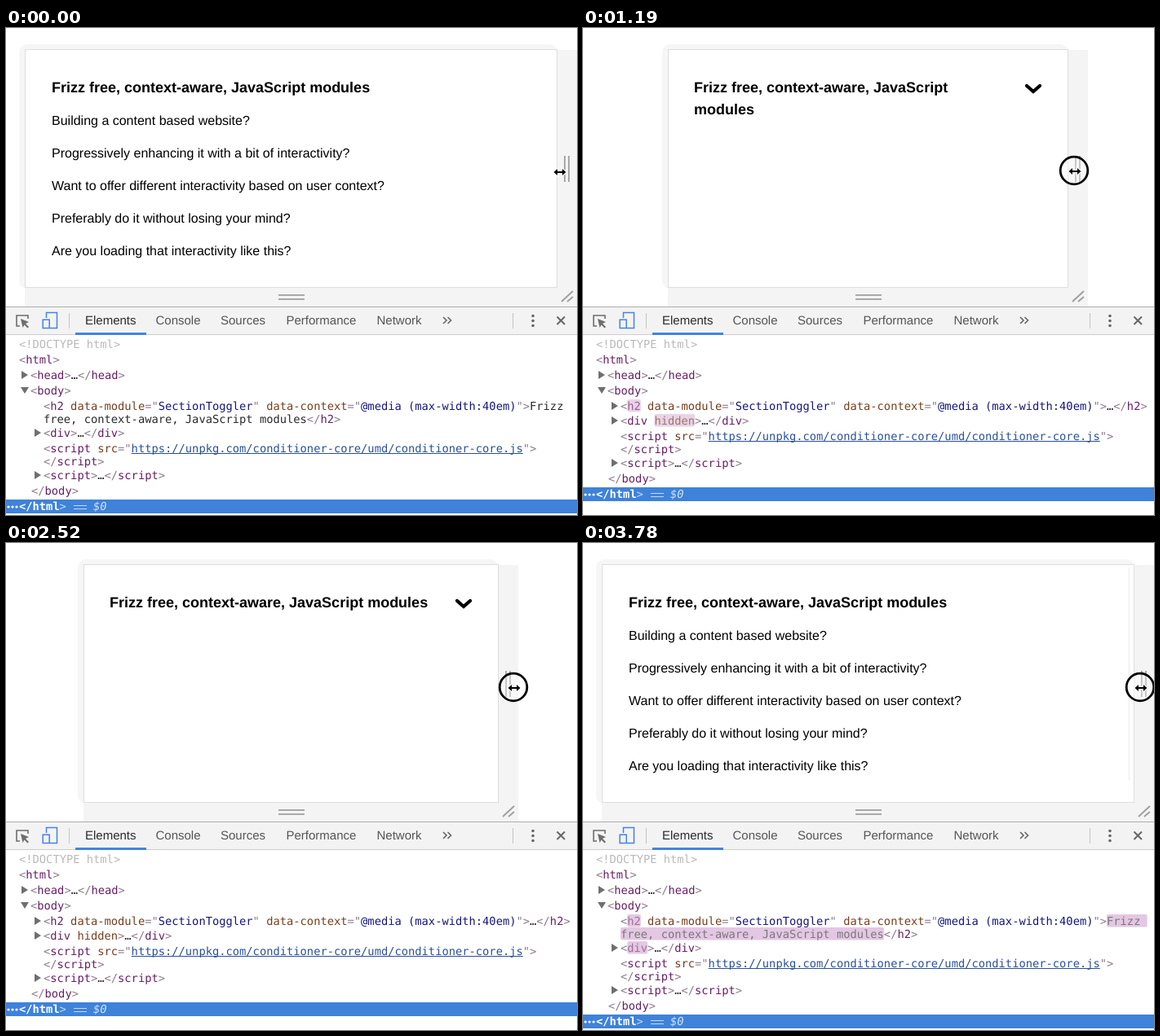
Animation of 700x598 px, one loop 3850 ms. Source, as an HTML page with a canvas:

```html
<!DOCTYPE html>
<html lang="en">
<head>
<meta charset="utf-8">
<title>Context-aware modules</title>
<style>
html, body { margin: 0; width: 700px; height: 598px; overflow: hidden; background: #fff; }
canvas { display: block; width: 700px; height: 598px; }
</style>
</head>
<body>
<canvas id="stage"></canvas>
<script>
const WIDTH = 700, HEIGHT = 598, LOOP = 3850, STEP = 70;
const COLLAPSE_AT = 210, EXPAND_AT = 2940, PRESS_AT = 140;
const SANS = '"Liberation Sans", Arial, sans-serif';
const MONO = '13.75px "DejaVu Sans Mono", Menlo, monospace';
const canvas = document.getElementById('stage');
const ctx = canvas.getContext('2d');
const ratio = window.devicePixelRatio || 1;
canvas.width = WIDTH * ratio;
canvas.height = HEIGHT * ratio;

// time, left edge of the viewport, pointer x, pointer y, content padding
const KEYS = [
  [0, 23, 679, 177, 33], [140, 23, 681, 177, 33], [350, 52, 648, 176, 35],
  [560, 84, 614, 175, 36], [770, 102, 604, 175, 33], [1190, 104, 602, 175, 32],
  [1800, 178, 529, 176, 32], [1950, 182, 526, 177, 32], [2100, 172, 550, 177, 32],
  [2240, 148, 576, 177, 32], [2520, 95, 622, 177, 32], [2870, 41, 667, 177, 33],
  [2940, 28, 680, 177, 33], [3010, 23, 684, 177, 33], [3290, 23, 684, 177, 33],
  [3780, 23, 683, 177, 33], [3850, 23, 683, 177, 33]
];
const HEADING = 'Frizz free, context-aware, JavaScript modules';
const PARAGRAPHS = [
  'Building a content based website?',
  'Progressively enhancing it with a bit of interactivity?',
  'Want to offer different interactivity based on user context?',
  'Preferably do it without losing your mind?',
  'Are you loading that interactivity like this?'
];

// Token kinds; an upper-case kind is flashed when the DOM changes.
const COLORS = {
  d: [185, 185, 185], p: [142, 122, 140], t: [104, 30, 100], a: [120, 62, 30],
  v: [22, 22, 125], l: [42, 80, 155], k: [40, 42, 46]
};
const attr = (name, value, kind = 'v') =>
  ['a', ' ' + name, 'p', '="', kind, value, 'p', '"'];
const folded = tag => ['p', '<', 't', tag, 'p', '>', 'k', '…', 'p', '</', 't', tag, 'p', '>'];
const closing = tag => ['p', '</', 't', tag, 'p', '>'];
const MODULE = [...attr('data-module', 'SectionToggler'),
  ...attr('data-context', '@media (max-width:40em)'), 'p', '>'];
const SCRIPT = ['p', '<', 't', 'script',
  ...attr('src', 'https://unpkg.com/conditioner-core/umd/conditioner-core.js', 'l'), 'p', '>'];

// Rows: centre y, x, tokens, arrow
const HEAD = [
  [388, 16, ['d', '<!DOCTYPE html>']],
  [407, 16, ['p', '<', 't', 'html', 'p', '>']],
  [426, 30, folded('head'), 'right'],
  [445, 30, ['p', '<', 't', 'body', 'p', '>'], 'down']
];
const tail = y => [
  [y, 46, SCRIPT],
  [y + 16, 46, closing('script')],
  [y + 33, 46, folded('script'), 'right'],
  [y + 52, 31, closing('body')]
];
const EXPANDED = [
  ...HEAD,
  [464, 46, ['p', '<', 'T', 'h2', ...MODULE, 'K', 'Frizz ']],
  [480, 46, ['K', 'free, context-aware, JavaScript modules', ...closing('h2')]],
  [497, 46, ['p', '<', 'T', 'div', ...folded('div').slice(4)], 'right'],
  ...tail(516)
];
const COLLAPSED = [
  ...HEAD,
  [464, 46, ['p', '<', 'T', 'h2', ...MODULE, 'k', '…', ...closing('h2')], 'right'],
  [482, 46, ['p', '<', 't', 'div ', 'A', 'hidden', ...folded('div').slice(4)], 'right'],
  ...tail(501)
];

function pose(t) {
  const i = Math.max(1, KEYS.findIndex(key => key[0] > t));
  const from = KEYS[i - 1], to = KEYS[i];
  const u = (t - from[0]) / (to[0] - from[0]);
  const [left, px, py, pad] = from.slice(1).map((v, n) => Math.round(v + (to[n + 1] - v) * u));
  return { left, right: 699 - left, px, py, pad };
}

function rect(x, y, w, h, color) {
  ctx.fillStyle = color;
  ctx.fillRect(x, y, w, h);
}

function round(x, y, w, h, r, color) {
  ctx.fillStyle = color;
  ctx.beginPath();
  ctx.roundRect(x, y, w, h, r);
  ctx.fill();
}

function path(points, color, width) {
  ctx.beginPath();
  points.forEach(([x, y]) => ctx.lineTo(x, y));
  ctx.strokeStyle = color;
  ctx.lineWidth = width;
  ctx.stroke();
}

function shape(points, color) {
  ctx.beginPath();
  points.forEach(([x, y]) => ctx.lineTo(x, y));
  ctx.closePath();
  ctx.fillStyle = color;
  ctx.fill();
}

function dot(x, y, r, color) {
  ctx.beginPath();
  ctx.arc(x, y, r, 0, 7);
  ctx.fillStyle = color;
  ctx.fill();
}

function text(str, x, y, font, color) {
  ctx.font = font;
  ctx.fillStyle = color;
  ctx.fillText(str, x, y);
}

function wrap(str, width) {
  const lines = [''];
  for (const word of str.split(' ')) {
    const last = lines[lines.length - 1];
    const longer = last ? last + ' ' + word : word;
    if (last && ctx.measureText(longer).width > width) lines.push(word);
    else lines[lines.length - 1] = longer;
  }
  return lines;
}

function drawViewport({ left, right, pad }, collapsed, t) {
  round(left - 7, 20, right - left + 7, 300, 10, '#f6f6f6');
  rect(right, 27, 24, 315, '#f4f4f4');
  rect(left, 318, right - left + 24, 24, '#f4f4f4');
  rect(left, 26, right - left, 293, '#dedede');
  rect(left + 1, 27, right - left - 2, 291, '#fff');

  for (const x of [8, 13]) rect(right + x, 157, 2, 32, '#a9a9a9');
  for (const y of [327, 332]) rect(334, y, 32, 2, '#a9a9a9');
  path([[right + 5, 336], [right + 19, 323]], '#a0a0a0', 2);
  path([[right + 12, 336], [right + 19, 330]], '#a0a0a0', 2);

  const x = left + pad, headingFont = 'bold 18px ' + SANS;
  ctx.font = headingFont;
  const room = collapsed ? right - 74 - x : 600;
  wrap(HEADING, room).forEach((line, i) => text(line, x, 79 + 27 * i, headingFont, '#000'));

  if (collapsed) {
    const cx = right - 11 - pad;
    ctx.lineCap = 'round';
    path([[cx - 8, 71], [cx, 78], [cx + 8, 71]], '#000', 4.3);
    ctx.lineCap = 'butt';
    return;
  }
  PARAGRAPHS.forEach((line, i) => text(line, x, 119 + 40 * i, '16px ' + SANS, '#000'));
  if (t >= EXPAND_AT) {
    ctx.globalAlpha = Math.min(1, Math.max(0.2, 1 - (t - 3430) / 400));
    round(right - 8, 30, 3, 262, 1.5, '#d2d2d2');
    ctx.globalAlpha = 1;
  }
}

function drawToolbar() {
  rect(0, 342, WIDTH, 35, '#f3f3f3');
  rect(0, 342, WIDTH, 1, '#adadad');
  rect(0, 376, WIDTH, 1, '#cccccc');
  rect(85, 374, 87, 3, '#4285e0');

  path([[17, 366], [13, 366], [13, 353], [27, 353], [27, 357]], '#6e6e6e', 1.6);
  shape([[18, 357], [28, 361], [24, 363], [28, 367], [26.5, 368.5], [22.5, 364.5], [20.5, 368]], '#6e6e6e');
  ctx.strokeStyle = '#4583e0';
  ctx.lineWidth = 1.5;
  ctx.strokeRect(49.5, 349.5, 13, 19);
  rect(44, 356, 10, 14, '#f3f3f3');
  ctx.strokeRect(45.2, 358.2, 8, 10.3);

  for (const x of [77, 621]) rect(x, 350, 1, 19, '#c4c4c4');
  const tabs = [['Elements', 97], ['Console', 183.5], ['Sources', 263], ['Performance', 343.5], ['Network', 454.5]];
  tabs.forEach(([name, x], i) => text(name, x, 364, '15px ' + SANS, i ? '#555' : '#2b2b2b'));
  for (const x of [536, 541.5]) path([[x, 355], [x + 4, 359], [x, 363]], '#666', 1.6);
  for (const y of [353.5, 359.5, 365.5]) dot(646, y, 1.8, '#666');
  path([[675.5, 354.5], [685, 364]], '#666', 2);
  path([[685, 354.5], [675.5, 364]], '#666', 2);
}

function drawRow([y, x, tokens, arrow], flash) {
  if (arrow === 'right') shape([[x - 11, y - 5], [x - 3, y], [x - 11, y + 5]], '#6e6e6e');
  if (arrow === 'down') shape([[x - 12, y - 4], [x - 2, y - 4], [x - 7, y + 4]], '#6e6e6e');
  ctx.font = MONO;
  for (let i = 0; i < tokens.length; i += 2) {
    const kind = tokens[i].toLowerCase(), str = tokens[i + 1];
    const width = ctx.measureText(str).width;
    let color = COLORS[kind];
    if (kind !== tokens[i] && flash) {
      round(x, y - 8, width, 15.5, 2, `rgba(158,54,153,${flash})`);
      const pale = Math.min(1, flash * 1.35);
      color = color.map(c => c + (255 - c) * pale);
    }
    text(str, x, y + 5, MONO, `rgb(${color})`);
    if (kind === 'l') rect(x, y + 6, width, 1, `rgb(${color})`);
    x += width;
  }
}

function drawSelection(y) {
  rect(0, y - 8, WIDTH, 17, '#3e82da');
  for (const x of [3, 8, 13]) dot(x, y + 1, 1.6, '#fff');
  text('</html', 16, y + 5, 'bold ' + MONO, '#fff');
  text('>', 65.5, y + 5, MONO, '#c5dbf6');
  for (const dy of [-1, 3]) rect(83, y + dy, 16, 1, '#c5dbf6');
  text('$0', 107, y + 5, 'italic ' + MONO, '#d3e3f8');
}

function drawPointer(x, y, pressed) {
  if (pressed) {
    dot(x, y, 17, 'rgba(255,255,255,.35)');
    ctx.beginPath();
    ctx.arc(x, y, 16.8, 0, 7);
    ctx.strokeStyle = '#000';
    ctx.lineWidth = 2.8;
    ctx.stroke();
    x += 1;
    y += 1;
  }
  const arrow = [[-7.5, 0], [-3, -4], [-3, -1], [3, -1], [3, -4],
    [7.5, 0], [3, 4], [3, 1], [-3, 1], [-3, 4], [-7.5, 0]].map(([dx, dy]) => [x + dx, y + dy]);
  path(arrow, '#fff', 2.5);
  shape(arrow, '#000');
}

function draw(t) {
  const state = pose(t);
  const collapsed = t >= COLLAPSE_AT && t < EXPAND_AT;
  const age = t - (collapsed ? COLLAPSE_AT : EXPAND_AT);
  const flash = age >= 0 && age < 1600 ? Math.exp(-age / 650) : 0;

  ctx.setTransform(ratio, 0, 0, ratio, 0, 0);
  ctx.textRendering = 'geometricPrecision';
  rect(0, 0, WIDTH, HEIGHT, '#fff');
  drawViewport(state, collapsed, t);
  drawToolbar();
  for (const row of collapsed ? COLLAPSED : EXPANDED) drawRow(row, flash);
  drawSelection(collapsed ? 572 : 587);
  drawPointer(state.px, state.py, t >= PRESS_AT);
}

let start;
function tick(now) {
  start ??= now;
  draw(Math.floor(((now - start) % LOOP) / STEP) * STEP);
  requestAnimationFrame(tick);
}
draw(0);
requestAnimationFrame(tick);
</script>
</body>
</html>
```
